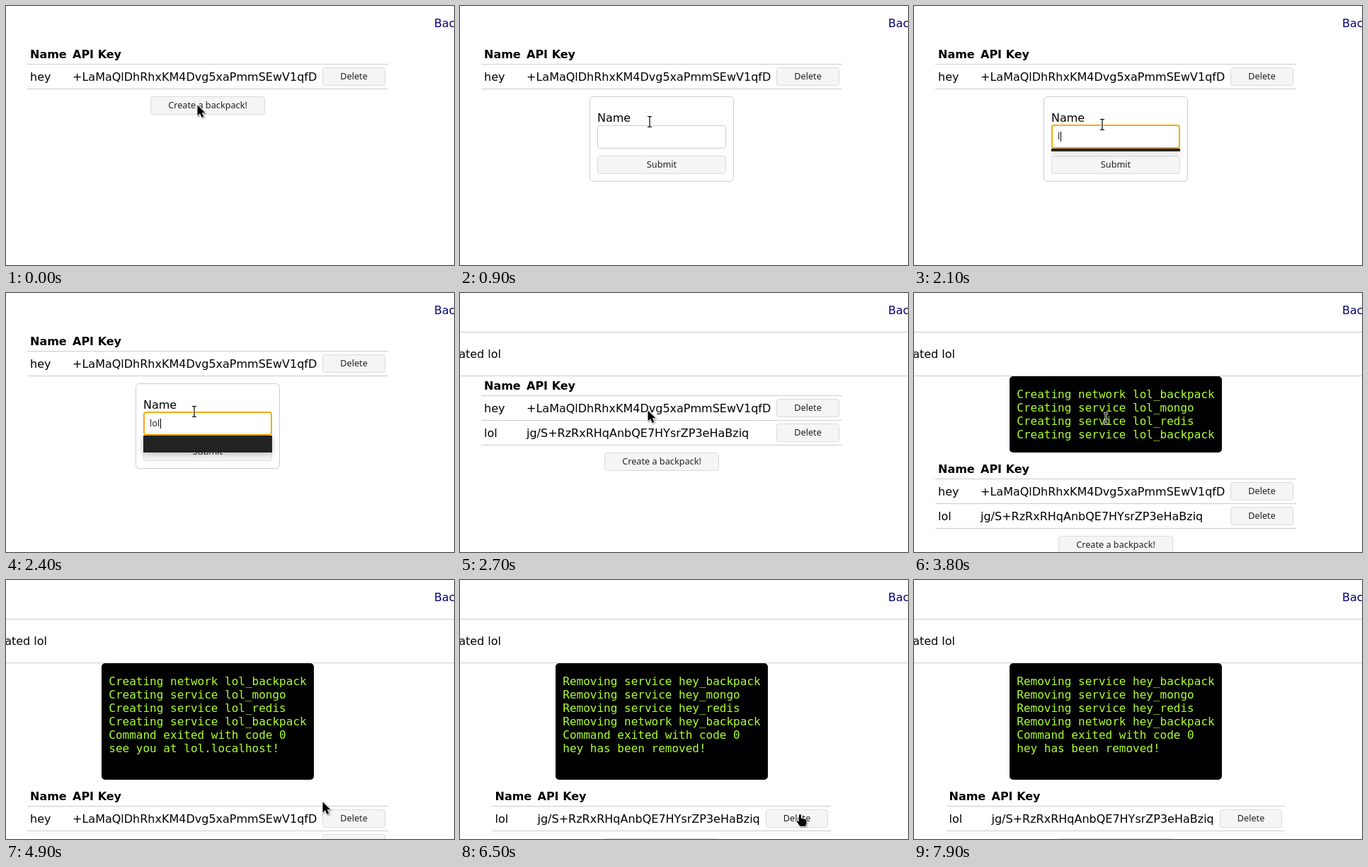
An HTML page with a canvas for the animation above (8200 ms loop, 633x367 px).

```html
<!DOCTYPE html>
<html lang="en">
<head>
<meta charset="utf-8">
<title>Backpacks</title>
<style>
  html, body { margin: 0; width: 100%; height: 100%; overflow: hidden; background: #fff; }
  canvas { display: block; }
</style>
</head>
<body>
<canvas id="stage" width="633" height="367"></canvas>
<script>
const ctx = document.getElementById('stage').getContext('2d');
const LOOP = 8200;
const SANS = '16px "DejaVu Sans", sans-serif';
const BOLD = 'bold ' + SANS;
const MONO = '16px "DejaVu Sans Mono", monospace';
const UI = '12.7px "Noto Sans", sans-serif';

const KEYS = {
  hey: '+LaMaQlDhRhxKM4Dvg5xaPmmSEwV1qfD',
  lol: 'jg/S+RzRxRHqAnbQE7HYsrZP3eHaBziq'
};
const CREATED = ['Creating network lol_backpack', 'Creating service lol_mongo',
  'Creating service lol_redis', 'Creating service lol_backpack',
  'Command exited with code 0', 'see you at lol.localhost!', ''];
const REMOVED = ['Removing service hey_backpack', 'Removing service hey_mongo',
  'Removing service hey_redis', 'Removing network hey_backpack',
  'Command exited with code 0', 'hey has been removed!', ''];

// Pointer positions, each held until the next: time, shape, x, y
const POINTER = [
  [0, 'arrow', 270, 140], [500, 'arrow', 270, 141],
  [800, 'arrow', 269, 148], [900, 'beam', 268, 164], [1000, 'beam', 267, 176],
  [1100, 'beam', 266, 182], [1300, 'beam', 266, 175], [1400, 'beam', 266, 168],
  [2700, 'arrow', 265, 166], [2800, 'beam', 266, 167],
  [3800, 'beam', 271, 178], [3900, 'beam', 279, 184], [4000, 'beam', 290, 190],
  [4100, 'beam', 303, 196], [4200, 'beam', 317, 201], [4300, 'beam', 330, 205],
  [4400, 'beam', 339, 208], [4500, 'beam', 344, 209],
  [4600, 'beam', 356, 222], [4700, 'beam', 382, 248], [4800, 'arrow', 415, 285],
  [4900, 'arrow', 447, 314], [5000, 'hand', 471, 331], [5100, 'hand', 469, 326],
  [5300, 'hand', 475, 332], [7100, 'arrow', 451, 338], [7300, 'arrow', 382, 364],
  [7500, 'none', 0, 0], [7800, 'arrow', 71, 51], [7900, 'none', 0, 0]
];
const SHAPES = {
  arrow: new Path2D('M.5 .5V15.5L4 12.3L6.6 18L9.3 16.8L6.8 11.2H11.3Z'),
  beam: new Path2D('M-3 -7.5H-1L0 -6.5L1 -7.5H3M0 -6.5V6.5M-3 7.5H-1L0 6.5L1 7.5H3'),
  hand: new Path2D('M4 1Q5.5 -.5 7 1V6Q8.5 5 9.5 6.5Q11 5.5 12 7Q14.5 6.5 14.5 9V13L13 17H5.5L.8 10.5Q1 8.5 3 9.5L4 10.5Z')
};

function text(str, x, y, font = SANS, color = '#000', align = 'left') {
  ctx.font = font;
  ctx.fillStyle = color;
  ctx.textAlign = align;
  ctx.fillText(str, x, y);
}

function box(x, y, w, h, radius, fill, stroke, line = 1) {
  const inset = stroke ? line / 2 : 0;
  ctx.beginPath();
  ctx.roundRect(x + inset, y + inset, w - 2 * inset, h - 2 * inset, radius);
  ctx.fillStyle = fill;
  ctx.fill();
  if (!stroke) return;
  ctx.strokeStyle = stroke;
  ctx.lineWidth = line;
  ctx.stroke();
}

function rule(y, left = 0, right = 633) {
  ctx.fillStyle = '#ccc';
  ctx.fillRect(left, y, right - left, 1);
}

function button(label, x, y, w, focused) {
  box(x, y, w, 26, 3, '#f5f5f5', '#dadada');
  text(label, x + w / 2, y + 17, UI, '#222', 'center');
  if (!focused) return;
  ctx.setLineDash([1, 1]);
  ctx.strokeStyle = '#222';
  ctx.strokeRect(x + 3.5, y + 3.5, w - 7, 19);
  ctx.setLineDash([]);
}

// Draws the table and returns the y of its last rule
function table(y, names, deleting) {
  const inset = names.includes('hey') ? 0 : 15.5;
  const left = 30 + inset, right = 540 - inset;
  text('Name', left + 4, y, BOLD);
  text('API Key', left + 64, y, BOLD);
  let line = y + 8;
  rule(line, Math.round(left), Math.floor(right));
  for (const name of names) {
    text(name, left + 4, line + 24);
    text(KEYS[name], left + 64, line + 24);
    button('Delete', Math.round(right - 93), line + 5, inset ? 88 : 89, deleting && name === 'hey');
    line += 35;
    rule(line, Math.round(left), Math.floor(right));
  }
  return line;
}

function form(t) {
  const focused = t >= 1100;
  const typed = 'lol'.slice(0, t < 2100 ? 0 : t < 2300 ? 1 : t < 2400 ? 2 : 3);
  box(183, 128, 204, 121, 5, '#fff', '#ccc');
  text('Name', 194, 164);
  button('Submit', 194, 212, 182);
  if (focused) box(194, 168, 182, 34, 3, '#fff', '#f5ab10', 2);
  else box(194, 169, 182, 33, 3, '#fff', '#ccc');
  text(typed, 203, 189, UI, '#222');
  if (focused) {
    ctx.fillStyle = '#000';
    ctx.fillRect(Math.round(204 + ctx.measureText(typed).width), 178, 1, 14);
  }
  if (t >= 2100 && t < 2500) {
    const height = t < 2200 ? 4 : t < 2300 ? 126 : t < 2400 ? 64 : 24;
    ctx.save();
    ctx.shadowColor = 'rgba(0,0,0,.25)';
    ctx.shadowBlur = 8;
    ctx.shadowOffsetY = 2;
    box(194, 202, 182, height, 0, '#222');
    ctx.restore();
  }
}

function terminal(lines) {
  const height = 32 + 19 * lines.length;
  box(135, 118, 300, height, 5, '#000');
  lines.forEach((line, i) => text(line, 145.3, 149 + 19 * i, MONO, '#adff2f'));
  return height + 10;
}

function pointer(t) {
  const [, shape, x, y] = POINTER.findLast(p => p[0] <= t);
  if (shape === 'none') return;
  const path = SHAPES[shape];
  ctx.save();
  ctx.translate(x, y);
  ctx.lineJoin = 'round';
  ctx.strokeStyle = '#fff';
  if (shape === 'beam') {
    ctx.lineWidth = 3;
    ctx.stroke(path);
    ctx.strokeStyle = '#000';
    ctx.lineWidth = 1.2;
    ctx.stroke(path);
  } else {
    ctx.shadowColor = 'rgba(0,0,0,.45)';
    ctx.shadowBlur = 2;
    ctx.shadowOffsetX = ctx.shadowOffsetY = 1;
    ctx.lineWidth = 1.6;
    ctx.stroke(path);
    ctx.shadowColor = 'transparent';
    ctx.fillStyle = '#000';
    ctx.fill(path);
  }
  ctx.restore();
}

function draw(t) {
  ctx.fillStyle = '#fff';
  ctx.fillRect(0, 0, 633, 367);
  text('Backpacks', 605, 30, SANS, '#000070');

  if (t < 2700) {
    const end = table(74, ['hey']);
    if (t < 400) button('Create a backpack!', 204, end + 11, 162, t >= 300);
    else form(t);
  } else {
    rule(55);
    rule(117);
    text('Created lol', 58, 92, SANS, '#000', 'right');
    const count = t < 2800 ? 0 : t < 3400 ? 2 : t < 3700 ? 3 : t < 4200 ? 4 : 7;
    const lines = t < 6300 ? CREATED.slice(0, count) : REMOVED;
    const shift = count ? terminal(lines) : 0;
    const end = table(137 + shift, t < 6500 ? ['hey', 'lol'] : ['lol'], t >= 6100);
    button('Create a backpack!', 204, end + 11, 162);
  }
  pointer(t);
}

function tick() {
  draw(performance.now() % LOOP);
  requestAnimationFrame(tick);
}
tick();
</script>
</body>
</html>
```
